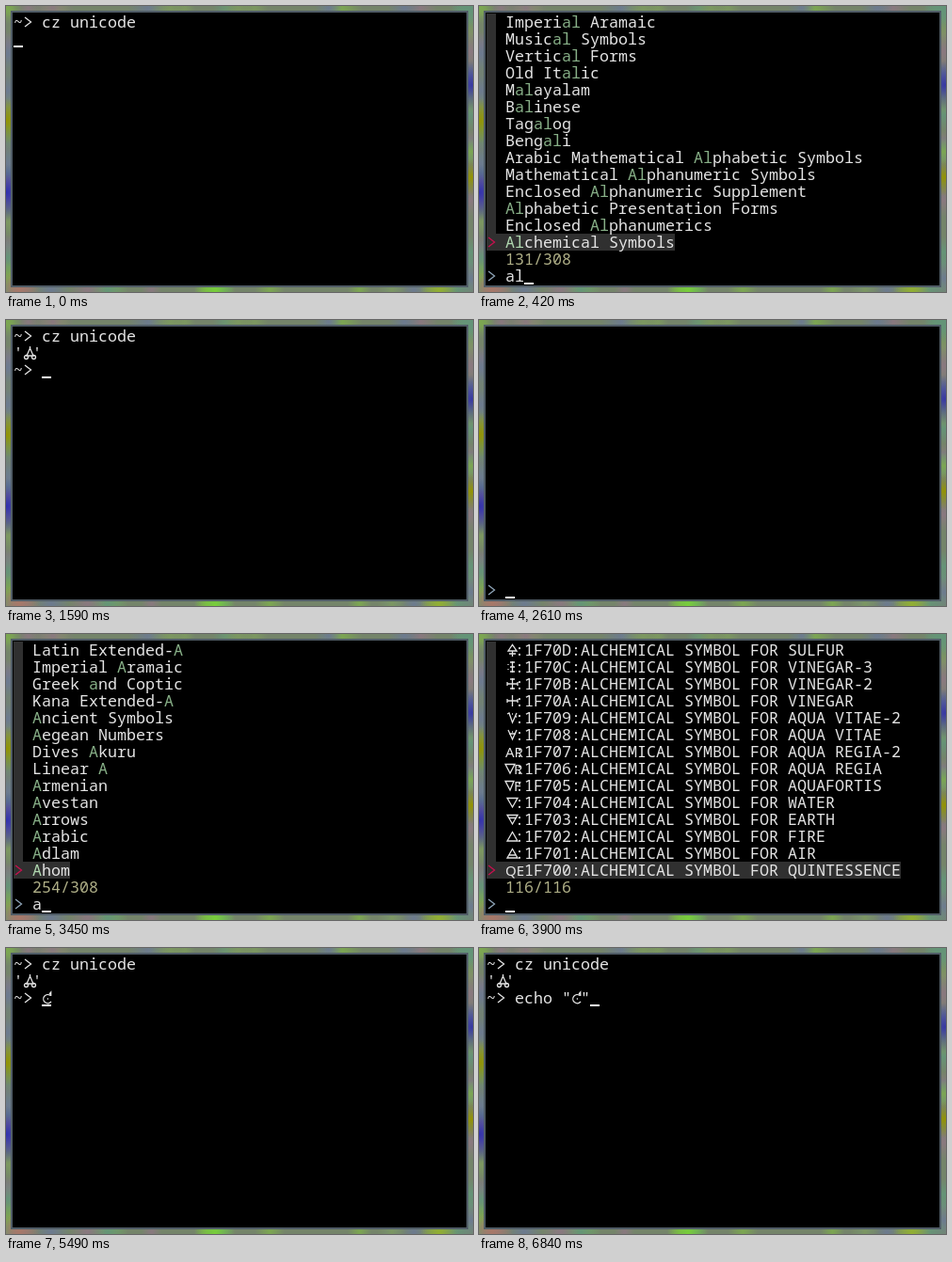
An HTML page with a canvas that plays this animation: 496x304 px, repeating every 7050 ms.

```html
<!DOCTYPE html>
<html lang="en">
<head>
<meta charset="utf-8">
<title>Symbol picker</title>
<style>
  html, body { margin: 0; width: 100%; height: 100%; overflow: hidden; background: #000; }
  canvas { display: block; width: 496px; height: 304px; }
</style>
</head>
<body>
<canvas id="stage" width="496" height="304"></canvas>
<script>
const stage = document.getElementById('stage');
const ctx = stage.getContext('2d');
const LOOP = 7050, COL = 10, ROW = 18, PAD = 8, ROWS = 14;
const MONO = '200 16.667px "Noto Sans Mono", "DejaVu Sans Mono", monospace';
const SANS = '15px "Noto Sans", "DejaVu Sans", sans-serif';
const INK = '#e4e4e4', HIT = '#87af87', HIT_SELECTED = '#afd7af', COUNT = '#afaf87';
const PROMPT = '#8fa5b8', POINTER = '#c8104f', SELECTED = '#303030';

const blocks = `Adlam,Aegean Numbers,Ahom,Alchemical Symbols,Alphabetic Presentation Forms,
Anatolian Hieroglyphs,Ancient Greek Musical Notation,Ancient Greek Numbers,Ancient Symbols,
Arabic,Arabic Extended-A,Arabic Mathematical Alphabetic Symbols,Arabic Presentation Forms-A,
Arabic Presentation Forms-B,Arabic Supplement,Armenian,Arrows,Avestan,Balinese,Basic Latin,Bengali,
Block Elements,Box Drawing,Braille Patterns,Cyrillic,Devanagari,Dives Akuru,Enclosed Alphanumerics,
Enclosed Alphanumeric Supplement,General Punctuation,Geometric Shapes,Greek and Coptic,Hebrew,
Imperial Aramaic,Kana Extended-A,Katakana,Kayah Li,Latin Extended-A,Latin-1 Supplement,Linear A,
Malayalam,Mathematical Alphanumeric Symbols,Mathematical Operators,Musical Symbols,Old Italic,
Small Form Variants,Tagalog,Tai Le,Tamil,Vertical Forms`.replace(/\n/g, '').split(',');

const names = `QUINTESSENCE,AIR,FIRE,EARTH,WATER,AQUAFORTIS,AQUA REGIA,AQUA REGIA-2,AQUA VITAE,
AQUA VITAE-2,VINEGAR,VINEGAR-2,VINEGAR-3,SULFUR,PHILOSOPHERS SULFUR,BLACK SULFUR,MERCURY SUBLIMATE,
MERCURY SUBLIMATE-2,MERCURY SUBLIMATE-3,CINNABAR,SALT,NITRE,VITRIOL,VITRIOL-2,ROCK SALT,ROCK SALT-2,
GOLD,SILVER,IRON ORE,IRON ORE-2,CROCUS OF IRON,REGULUS OF IRON,COPPER ORE,IRON-COPPER ORE,
SUBLIMATE OF COPPER,CROCUS OF COPPER,CROCUS OF COPPER-2,COPPER ANTIMONIATE,
SALT OF COPPER ANTIMONIATE,SUBLIMATE OF SALT OF COPPER,VERDIGRIS,TIN ORE,LEAD ORE,ANTIMONY ORE,
SUBLIMATE OF ANTIMONY,SALT OF ANTIMONY,SUBLIMATE OF SALT OF ANTIMONY,VINEGAR OF ANTIMONY,
REGULUS OF ANTIMONY,REGULUS OF ANTIMONY-2,REGULUS,REGULUS-2,REGULUS-3,REGULUS-4,ALKALI,ALKALI-2,
MARCASITE,SAL-AMMONIAC,ARSENIC,REALGAR,REALGAR-2,AURIPIGMENT,BISMUTH ORE,TARTAR,TARTAR-2,QUICK LIME,
BORAX,BORAX-2,BORAX-3,ALUM,OIL,SPIRIT,TINCTURE,GUM,WAX,POWDER,CALX,TUTTY,CAPUT MORTUUM,
SCEPTER OF JOVE,CADUCEUS,TRIDENT,STARRED TRIDENT,LODESTONE,SOAP,URINE,HORSE DUNG,ASHES,POT ASHES,
BRICK,POWDERED BRICK,AMALGAM,STRATUM SUPER STRATUM,STRATUM SUPER STRATUM-2,SUBLIMATION,PRECIPITATE,
DISTILL,DISSOLVE,DISSOLVE-2,PURIFY,PUTREFACTION,CRUCIBLE,CRUCIBLE-2,CRUCIBLE-3,CRUCIBLE-4,CRUCIBLE-5,
ALEMBIC,BATH OF MARY,BATH OF VAPOURS,RETORT,HOUR,NIGHT,DAY-NIGHT,MONTH,HALF DRAM,HALF OUNCE`
  .replace(/\n/g, '').split(',');
const symbols = names.map((name, i) =>
  (0x1f700 + i).toString(16).toUpperCase() + ':ALCHEMICAL SYMBOL FOR ' + name);

// Glyphs: path data, optionally followed by "|x,letters".
const ring = (x, y, r) => `M${x - r} ${y}a${r} ${r} 0 1 0 ${2 * r} 0a${r} ${r} 0 1 0 ${-2 * r} 0`;
const up = 'M2 12H13L7.5 2.5Z', down = 'M2 2.5H13L7.5 12Z', cross = 'M7.5 1V13M2 7H13';
const glyphs = {
  'QUINTESSENCE': '|0,QE',
  'AIR': up + 'M4 9H11',
  'FIRE': up,
  'EARTH': down + 'M4 5.5H11',
  'WATER': down,
  'AQUAFORTIS': 'M0 2.5H9L5 12Z|9,F',
  'AQUA REGIA': 'M0 2.5H10L5 12Z|9,R',
  'AQUA REGIA-2': '|0,AR',
  'AQUA VITAE': 'M3 2L7.5 12L12 2M4 6H11M7 4H8',
  'AQUA VITAE-2': 'M2 3L4 2L7.5 12L12 2M7 3H8M11 6H12',
  'VINEGAR': cross + 'M2 5V9M13 5V9',
  'VINEGAR-2': cross + 'M5 2H10M5 12H10M2 5V9M13 5V9',
  'VINEGAR-3': 'M7.5 1V13M5 2H10M5 12H10M5 7H10M3 4V5M3 9V10',
  'SULFUR': 'M3 8H12L7.5 1.5ZM7.5 8V14M4 11H11',
  'SALT': ring(7.5, 7, 5) + 'M2.5 7H12.5',
  'NITRE': ring(7.5, 7, 5) + 'M7.5 1V13',
  'GOLD': ring(6, 8.5, 4.6) + ring(13, 3, 1.6) + 'M9 5L11 1M11 6H13M5.5 8.5H6.5',
  'GOLD TIGHT': 'M9 4.4A4.6 4.6 0 1 0 10 11M9.7 5V1L8 3M5.8 8H7',
  'ALUM': 'M4 7H12V12H4ZM6 7V3H8V7',
  'OIL': ring(7.5, 4, 2) + ring(4, 10, 2) + ring(11, 10, 2),
  'SPIRIT': 'M4 10L7.5 2L11 10ZM7.5 2V0' + ring(3.5, 11.5, 2) + ring(11.5, 11.5, 2),
  'GUM': ring(4, 5, 2.3) + ring(10, 5, 2.3) + 'M6 6Q7 10 2 12M12 6Q13 9 9 12H14',
  'WAX': 'M7.5 4L10.5 7L7.5 10L4.5 7ZM7.5 1V4M7.5 10V13M1 7H4M11 7H14',
  'CALX': '|2,c',
  'SOAP': 'M7.5 3L12 7L7.5 11L3 7Z',
  'HOUR': ring(7.5, 3, 2) + ring(4, 6.5, 2) + ring(11, 6.5, 2) + 'M3 13L7.5 8L12 13M4 10.5H11',
  'CHEVRON': 'M2 2L8.5 7L2 12'
};
const spare = ['SALT', 'VINEGAR', 'SOAP', 'OIL', 'NITRE', 'SULFUR', 'WAX', 'FIRE'];
const shapes = {};
for (const name in glyphs) {
  const [d, label] = glyphs[name].split('|');
  const [x, letters] = (label || '0,').split(',');
  shapes[name] = { path: new Path2D(d), x: +x, letters };
}

const inline = { '^': 'SPIRIT', '@': 'GOLD TIGHT', '>': 'CHEVRON' };

// Word start beats substring, substring beats scattered letters; then shorter wins.
function match(text, query) {
  const low = text.toLowerCase(), hits = [];
  const run = at => [...query].map((_, i) => at + i);
  for (let i = low.indexOf(query); i >= 0; i = low.indexOf(query, i + 1))
    if (!i || /[^a-z0-9]/.test(low[i - 1])) return { tier: 3, hits: run(i) };
  const at = low.indexOf(query);
  if (at >= 0) return { tier: 2, hits: run(at) };
  let from = -1;
  for (const ch of query) {
    from = low.indexOf(ch, from + 1);
    if (from < 0) return null;
    hits.push(from);
  }
  return { tier: 1, hits };
}

function search(list, query) {
  const all = list.map((text, id) => ({ text, id }));
  if (!query) return all.map(e => ({ ...e, hits: [] }));
  return all.map(e => ({ ...e, ...match(e.text, query) })).filter(e => e.tier)
    .sort((a, b) => b.tier - a.tier || a.text.length - b.text.length || a.id - b.id);
}

function put(str, col, row, color = INK, hits = [], hitColor = HIT) {
  ctx.font = MONO;
  [...str].forEach((ch, i) => {
    ctx.fillStyle = hits.includes(i) ? hitColor : color;
    ctx.fillText(ch, PAD + (col + i) * COL, PAD + row * ROW + 15);
  });
}

function glyph(name, col, row, color = INK) {
  const { path, x, letters } = shapes[name];
  ctx.save();
  ctx.translate(PAD + col * COL, PAD + row * ROW + 2);
  ctx.strokeStyle = ctx.fillStyle = color;
  ctx.lineWidth = 1.3;
  ctx.stroke(path);
  ctx.font = SANS;
  ctx.fillText(letters, x, 12.5);
  ctx.restore();
}

function cursor(col, row, height = 2) {
  ctx.fillStyle = '#fff';
  ctx.fillRect(PAD + col * COL, PAD + (row + 1) * ROW - height, COL, height);
}

function shell(lines, col, thin) {
  return () => {
    lines.forEach((line, row) => [...line].forEach((ch, i) =>
      inline[ch] ? glyph(inline[ch], i, row) : put(ch, i, row)));
    cursor(col, Math.max(lines.length - 1, 1), thin ? 1 : 2);
  };
}

function input(query) {
  glyph('CHEVRON', 0, ROWS + 1, PROMPT);
  put(query, 2, ROWS + 1);
  cursor(2 + query.length, ROWS + 1);
}

function picker(list, query, count) {
  const found = search(list, query);
  const label = count || found.length + '/' + list.length;
  return () => {
    ctx.fillStyle = SELECTED;
    ctx.fillRect(PAD, PAD, COL, ROWS * ROW);
    found.slice(0, ROWS).forEach((item, i) => {
      const row = ROWS - 1 - i, col = list === symbols ? 4 : 2;
      if (!i) {
        ctx.fillStyle = SELECTED;
        ctx.fillRect(PAD, PAD + row * ROW, (col + item.text.length) * COL, ROW);
        glyph('CHEVRON', 0, row, POINTER);
      }
      if (list === symbols) {
        const name = names[item.id];
        glyph(shapes[name] ? name : spare[item.id % spare.length], 2, row);
        if (name !== 'QUINTESSENCE') put(':', 3, row);
      }
      put(item.text, col, row, INK, item.hits, i ? HIT : HIT_SELECTED);
    });
    put(label, 2, ROWS, COUNT);
    input(query);
  };
}

const opening = () => input('');
const command = '~> cz unicode';
const line = (text, col, thin) => shell([command, "'^'", '~> ' + text], 3 + col, thin);
const steps = [];
const at = (time, draw) => steps.push([time, draw]);
const type = (list, word, times, counts = {}) =>
  times.forEach((time, i) => {
    const query = word.slice(0, i + 1);
    at(time, picker(list, query, counts[query]));
  });
const total = { a: '254/308', al: '131/308' };

at(0, shell([command], 0));
at(60, opening);
at(120, picker(blocks, '', '308/308'));
type(blocks, 'alch', [300, 390, 450, 540], total);
at(660, opening);
at(720, picker(symbols, ''));
type(symbols, 'spirit', [930, 1020, 1110, 1200, 1290, 1380]);
at(1530, shell([command], 0));
at(1590, line('', 0));
at(2610, opening);
at(2670, picker(blocks, '', '308/308'));
type(blocks, 'alch', [3450, 3540, 3600, 3690], total);
at(3840, opening);
at(3900, picker(symbols, ''));
type(symbols, 'gold', [4260, 4320, 4410, 4470]);
at(4920, line('', 0));
at(5010, line('@', 1));
at(5490, line('@', 0));
[5640, 5730, 5850, 5940, 6060].forEach((time, i) =>
  at(time, line('echo '.slice(0, i + 1) + '@', i + 1)));
at(6180, line('echo "@', 5, true));
at(6300, line('echo "@', 6));
at(6420, line('echo "@', 7));
at(6630, line('echo "@"', 7, true));
at(6840, line('echo "@"', 8));

// Soft mottled wallpaper showing around the terminal window.
function wallpaper() {
  const layer = document.createElement('canvas');
  layer.width = 496;
  layer.height = 304;
  const g = layer.getContext('2d');
  g.fillStyle = '#74846a';
  g.fillRect(0, 0, 496, 304);
  const blob = (x, y, r, color) => {
    const fade = g.createRadialGradient(x, y, 0, x, y, r);
    fade.addColorStop(0, color);
    fade.addColorStop(1, color + '00');
    g.fillStyle = fade;
    g.fillRect(x - r, y - r, 2 * r, 2 * r);
  };
  let seed = 11;
  const rand = () => (seed = seed * 16807 % 2147483647) / 2147483647;
  const tints = ['#7ca850', '#8a7880', '#6c7a90', '#7c9860', '#649478'];
  for (let i = 0; i < 70; i++) {
    const along = rand() * 496, side = i % 4;
    const x = side < 2 ? along : side === 2 ? 2 : 494;
    const y = side === 0 ? 2 : side === 1 ? 302 : along * 304 / 496;
    blob(x, y, 10 + rand() * 16, tints[i % tints.length]);
  }
  blob(0, 122, 24, '#949400');
  blob(0, 198, 30, '#3030b0');
  blob(495, 84, 26, '#3838a4');
  blob(495, 182, 20, '#949400');
  blob(222, 303, 22, '#78d038');
  blob(460, 303, 20, '#92b030');
  blob(14, 302, 22, '#a87868');
  g.fillStyle = '#505c66';
  g.fillRect(5, 5, 486, 294);
  g.fillStyle = '#000';
  g.fillRect(7, 7, 482, 290);
  return layer;
}
const backdrop = wallpaper();

const start = performance.now();
function frame() {
  const t = (performance.now() - start) % LOOP;
  let draw = steps[0][1];
  for (const [time, fn] of steps) if (time <= t) draw = fn;
  ctx.drawImage(backdrop, 0, 0);
  draw();
  requestAnimationFrame(frame);
}
frame();
</script>
</body>
</html>
```
